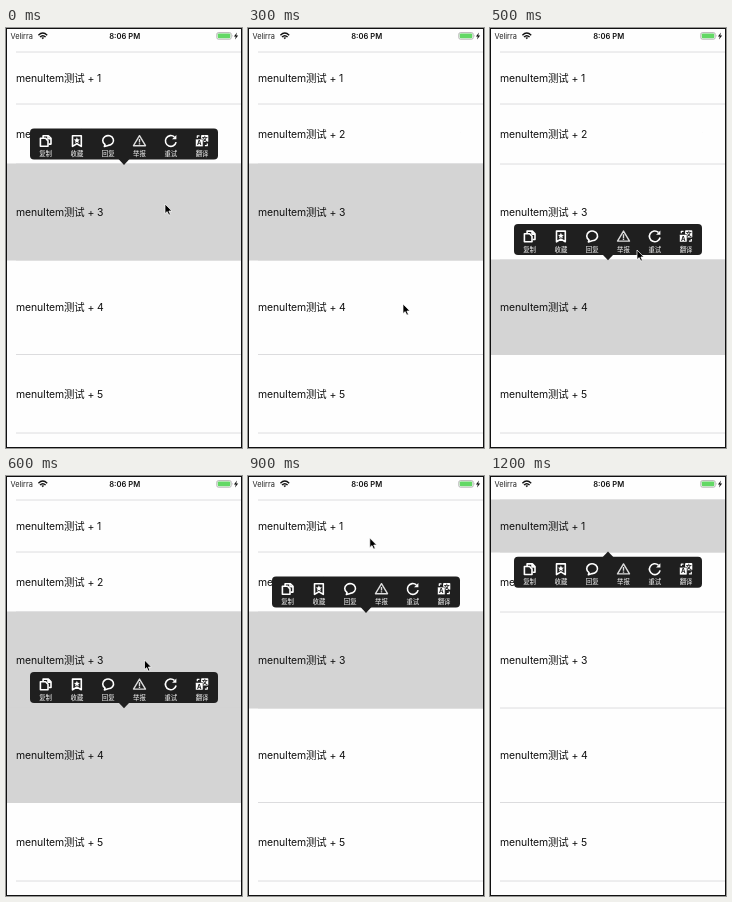
An HTML page that plays this animation: 236 px wide and 420 px high, repeating every 1.3 s.

```html
<!DOCTYPE html>
<html lang="zh-CN">
<head>
<meta charset="utf-8">
<title>Menu items</title>
<style>
html, body { margin: 0; width: 100%; height: 100%; overflow: hidden; background: #fff; }
svg { display: block; width: 236px; height: 420px; }
text { font-family: Inter, "Noto Sans CJK SC", "Noto Sans CJK", sans-serif; }
.item { font-size: 10.4px; letter-spacing: -.1px; fill: #111; }
.label { font-size: 6.4px; fill: #fff; text-anchor: middle; }
.line { fill: none; stroke: #fff; stroke-width: 1.6; stroke-linejoin: round; }
.glyph { font-size: 6px; font-weight: 700; text-anchor: middle; }
</style>
</head>
<body>
<svg viewBox="0 0 236 420">
  <rect width="236" height="420" fill="#fefefe"/>
  <g id="rows"></g>

  <g id="status">
    <text x="4.5" y="10.6" font-size="7.4" fill="#222">Velirra</text>
    <g fill="none" stroke="#111" stroke-width="1.4">
      <path d="M32.4 7.2Q36.8 3 41.2 7.2M34 9Q36.8 6.4 39.6 9"/>
      <path d="M35.4 9.8Q36.8 8.8 38.2 9.8L36.8 11.2Z" fill="#111" stroke="none"/>
    </g>
    <text x="118.7" y="10.7" font-size="7.6" font-weight="600" fill="#111" text-anchor="middle">8:06 PM</text>
    <rect x="210.8" y="4.6" width="14.4" height="6.6" rx="1.6" fill="none" stroke="#999" stroke-width=".7"/>
    <rect x="211.8" y="5.5" width="12.4" height="4.8" rx=".8" fill="#62d865"/>
    <path d="M226.1 6.8q1 1.1 0 2.2z" fill="#999"/>
    <path d="M231 4.6l-3.1 3.8h1.9l-.8 3 3.2-4h-2z" fill="#111"/>
  </g>

  <g id="menu">
    <rect x="24" width="188" height="31" rx="4" fill="#1f1f1f"/>
    <path id="arrow" fill="#1f1f1f"/>
    <g id="actions"></g>
  </g>

  <path id="cursor" d="M0 0V9.6L2.2 7.6 3.8 11.1 5.4 10.4 3.9 7H6.9Z" fill="#000" stroke="#fff" stroke-width=".7"/>
  <rect x=".5" y=".5" width="235" height="419" fill="none" stroke="#111"/>
</svg>
<script>
const $ = id => document.getElementById(id);
const edges = [24, 76, 136, 232, 326.5, 405];
const baselines = [53.7, 109.7, 187.9, 282.9, 369.5];

// Icons are drawn around their own centre.
const actions = [
  ['复制', '<path class="line" d="M-2.5 -3V-5.2H2.8L5.4 -2.6V3.2H3M2.4 -5V-2.2H5.2"/><path class="line" d="M-5.2 -2.6H0L2.4 0V5.4H-5.2Z"/>'],
  ['收藏', '<path class="line" d="M-4.4 -5.2H4.4V5.5L0 2.8 -4.4 5.5Z"/><path fill="#fff" d="M0 -3.6L.9 -1.6 3 -1.4 1.4 0 1.9 2.1 0 1 -1.9 2.1 -1.4 0 -3 -1.4 -.9 -1.6Z"/>'],
  ['回复', '<path class="line" d="M-3.2 3.6A5.4 4.9 0 1 1 0 4.5L-3.8 5.6Z"/>'],
  ['举报', '<path class="line" style="stroke:#ddd;stroke-width:1.4" d="M0 -5.2L6 4.8H-6Z"/><path stroke="#ddd" stroke-width="1.4" d="M0 -2V1.6M0 2.3V3.6"/>'],
  ['重试', '<path class="line" d="M5.3 1.2A5.4 5.4 0 1 1 3.6 -4"/><path fill="#fff" d="M5.6 -5.8V-1.6H1.3Z"/>'],
  ['翻译', '<rect x="-1" y="-6" width="7.2" height="7.2" rx=".8" fill="#fff"/><text class="glyph" x="2.7" y="-.2" fill="#1f1f1f">文</text>' +
    '<rect x="-6.6" y="-1.8" width="7.6" height="7.6" rx=".8" fill="#fff" stroke="#1f1f1f" stroke-width=".6"/><text class="glyph" x="-2.8" y="4.2" fill="#1f1f1f">A</text>' +
    '<path class="line" style="stroke-width:1.2" d="M2.8 4.8H5.2V2.6M-4.8 -3V-5H-2.6"/>']
];

$('rows').innerHTML =
  edges.map(y => `<path d="M10 ${y}H235" stroke="#d9d9db" stroke-width=".9"/>`).join('') +
  baselines.map((y, i) =>
    `<rect class="fill" x="1" y="${edges[i] - .5}" width="234" height="${edges[i + 1] - edges[i] + 1}" fill="#d4d4d4"/>`).join('') +
  baselines.map((y, i) => `<text class="item" x="10" y="${y}">menuItem测试 + ${i + 1}</text>`).join('');

$('actions').innerHTML = actions.map(([name, icon], i) => {
  const x = 39.6 + i * 31.3;
  return `<g transform="translate(${x} 12.3)">${icon}</g><text class="label" x="${x}" y="27.6">${name}</text>`;
}).join('');

const fills = [...document.querySelectorAll('.fill')];
const menuTop = { 1: 80.8, 3: 100.6, 4: 196 };

// Every 100 ms: selected rows, menu row, menu opacity, cursor tip
const steps = [
  [[3], 3, 1, 159, 176],
  [[3], 3, 1, 158, 218],
  [[3], 3, 1, 155, 272],
  [[3], 0, 0, 155, 276],
  [[4], 4, .82, 152.5, 253.5],
  [[4], 4, 1, 147, 222],
  [[3, 4], 4, 1, 138.5, 184],
  [[3], 3, .82, 138.5, 182],
  [[3], 3, 1, 130, 118],
  [[3], 3, 1, 121.8, 62],
  [[1], 1, 1, 121.8, 62],
  [[1], 1, 1, 121.8, 62],
  [[1], 1, 1, null, null]
];

function show([rows, menu, alpha, x, y]) {
  fills.forEach((el, i) => el.style.display = rows.includes(i + 1) ? '' : 'none');
  $('menu').style.display = menu ? '' : 'none';
  if (menu) {
    $('menu').setAttribute('opacity', alpha);
    $('menu').setAttribute('transform', `translate(0 ${menuTop[menu]})`);
    $('arrow').setAttribute('d', menu === 1 ? 'M112.5 .5L118 -5.3 123.5 .5Z' : 'M112.5 30.5L118 36.3 123.5 30.5Z');
  }
  $('cursor').style.display = x === null ? 'none' : '';
  if (x !== null) $('cursor').setAttribute('transform', `translate(${x} ${y})`);
}

const start = performance.now();
function tick() {
  const t = Math.max(0, performance.now() - start) % 1300;
  show(steps[Math.floor(t / 100)]);
  requestAnimationFrame(tick);
}
tick();
</script>
</body>
</html>
```
